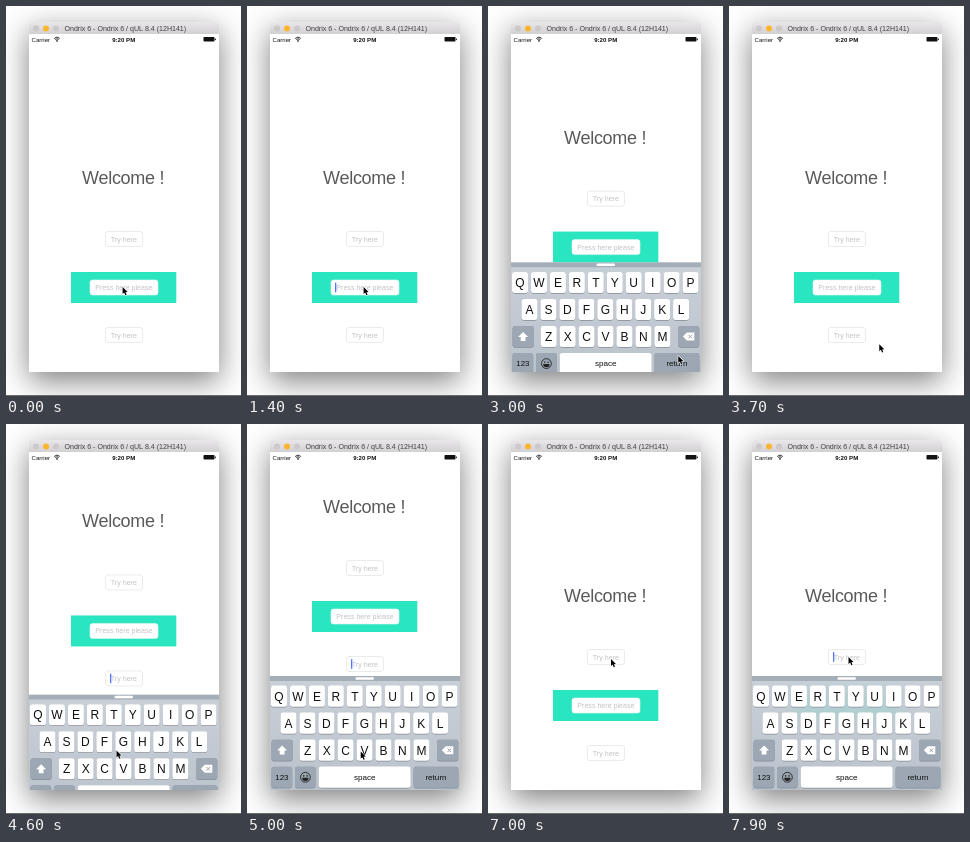
Recreate the animation shown at these times as an HTML page with a canvas. Size 235 by 390 pixels, loop 8000 ms.

```html
<!DOCTYPE html>
<html lang="en">
<head>
<meta charset="utf-8">
<title>Keyboard avoidance</title>
<style>
html, body { margin: 0; width: 100%; height: 100%; overflow: hidden; background: #fff; }
canvas { display: block; width: 235px; height: 390px; }
</style>
</head>
<body>
<canvas id="stage"></canvas>
<script>
const W = 235, H = 390, LOOP = 8000;
const SANS = '"Liberation Sans", Arial, sans-serif';
const TEAL = '#29e6c1';
const WIN = { x: 23, y: 16, w: 190, bottom: 366 };
const KEYS_H = 114, SLIDE = 500;

const canvas = document.getElementById('stage');
const ctx = canvas.getContext('2d');
const dpr = Math.max(1, window.devicePixelRatio || 1);
canvas.width = W * dpr;
canvas.height = H * dpr;

// Each keyboard session: show time, hide time, content lift, caret place
const sessions = [
  { show: 1450, hide: 2991, lift: 42, x: 88, y: 281.5 },
  { show: 4417, hide: 6150, lift: 89, x: 104, y: 329 },
  { show: 7350, hide: 9000, lift: 0, x: 104, y: 233 }
];

// Pointer stops: time, x, y
const pointer = [
  [0, 116.6, 281], [1450, 116.6, 281], [1800, 102.6, 279], [2150, 102.6, 279],
  [2800, 190.3, 350], [3250, 190.3, 350], [4150, 110.5, 326.5], [4900, 110.5, 326.5],
  [5700, 184, 351], [6250, 184, 351], [6950, 123, 235], [7100, 123, 235],
  [7320, 119.5, 233], [8000, 119.5, 233]
];

const clamp = v => Math.min(1, Math.max(0, v));
const smooth = v => v * v * (3 - 2 * v);
const cubic = (a, b, u) => 3 * a * u * (1 - u) ** 2 + 3 * b * u * u * (1 - u) + u ** 3;

function ease(x) {
  if (x <= 0 || x >= 1) return clamp(x);
  let lo = 0, hi = 1;
  for (let i = 0; i < 24; i++) {
    const mid = (lo + hi) / 2;
    if (cubic(0.38, 0.125, mid) < x) lo = mid; else hi = mid;
  }
  return cubic(0.7, 1, lo);
}

function state(t) {
  const s = sessions.findLast(k => t >= k.show - 50);
  if (!s) return { up: 0, lift: 0, caret: null };
  const up = ease((t - s.show) / SLIDE) - ease((t - s.hide) / SLIDE);
  const age = t - s.show + 50;
  const lit = t < s.hide && (age < 700 || age % 1000 < 680);
  return { up, lift: s.lift * up, caret: lit ? s : null };
}

function pointerAt(t) {
  const i = pointer.findIndex(p => p[0] > t);
  const a = pointer[i - 1], b = pointer[i];
  const k = smooth((t - a[0]) / (b[0] - a[0]));
  return [a[1] + (b[1] - a[1]) * k, a[2] + (b[2] - a[2]) * k];
}

function box(x, y, w, h, r, fill, line) {
  ctx.beginPath();
  ctx.roundRect(x, y, w, h, r);
  ctx.fillStyle = fill;
  ctx.fill();
  if (line) {
    ctx.strokeStyle = line;
    ctx.lineWidth = 0.6;
    ctx.stroke();
  }
}

function text(str, x, y, size, color, align = 'center', weight = '') {
  ctx.font = `${weight} ${size}px ${SANS}`;
  ctx.textAlign = align;
  ctx.textBaseline = 'alphabetic';
  ctx.fillStyle = color;
  ctx.fillText(str, x, y);
}

function dot(x, y, r, color) {
  ctx.beginPath();
  ctx.arc(x, y, r, 0, Math.PI * 2);
  ctx.fillStyle = color;
  ctx.fill();
}

function poly(points, fill) {
  ctx.beginPath();
  points.forEach(p => ctx.lineTo(...p));
  ctx.closePath();
  ctx.fillStyle = fill;
  ctx.fill();
}

function fade(y0, y1, a, b) {
  const g = ctx.createLinearGradient(0, y0, 0, y1);
  g.addColorStop(0, a);
  g.addColorStop(1, b);
  return g;
}

function drawWindow() {
  ctx.fillStyle = '#fff';
  ctx.fillRect(0, 0, W, H);
  ctx.save();
  ctx.shadowColor = 'rgba(0,0,0,.5)';
  ctx.shadowBlur = 30 * dpr;
  ctx.shadowOffsetY = 9 * dpr;
  box(WIN.x, WIN.y, WIN.w, WIN.bottom - WIN.y, [3, 3, 0, 0], '#fff');
  ctx.restore();
  box(WIN.x, WIN.y, WIN.w, 12, [3, 3, 0, 0], fade(16, 28, '#e9e7e9', '#d2d0d2'));
  ['#cdc8ca', '#fdb52d', '#cdc8ca'].forEach((c, i) => dot(30 + i * 10, 22.5, 3, c));
  text('Ondrix 6 - Ondrix 6 / qUL 8.4 (12H141)', 119.3, 25, 7.07, '#424142');
  ctx.fillStyle = '#6b6b6b';
  ctx.fillRect(0, 389, W, 1);
}

function drawStatus() {
  text('Carrier', 25.5, 35.5, 6.1, '#111', 'left');
  text('9:20 PM', 117.7, 35.5, 6.1, '#111', 'center', 'bold');
  ctx.strokeStyle = '#111';
  ctx.lineWidth = 0.9;
  for (const r of [2.3, 3.9]) {
    ctx.beginPath();
    ctx.arc(51, 35.2, r, -Math.PI * 0.76, -Math.PI * 0.24);
    ctx.stroke();
  }
  dot(51, 34.9, 0.8, '#111');
  box(197.5, 31, 11, 4.6, 0.8, '#111');
  box(209, 32.4, 0.9, 1.8, 0.4, '#111');
}

function field(label, x, y, w, line) {
  box(x, y - 7.5, w, 15, 2.5, '#fff', line);
  text(label, x + 5.3, y + 2.5, 7.1, '#c3c3c8', 'left');
}

function drawContent(s) {
  ctx.save();
  ctx.translate(0, -s.lift);
  ctx.letterSpacing = '-0.3px';
  text('Welcome !', 117.1, 178, 18, '#5a5a5a');
  ctx.letterSpacing = '0px';
  ctx.fillStyle = TEAL;
  ctx.fillRect(65, 266, 105.3, 31);
  field('Try here', 99.5, 233, 37, '#dedede');
  field('Press here please', 84, 281.5, 68, '#e2f3ef');
  field('Try here', 99.5, 329, 37, '#dedede');
  if (s.caret) {
    ctx.fillStyle = '#5574f6';
    ctx.fillRect(s.caret.x, s.caret.y - 4.8, 1.3, 9.6);
  }
  ctx.restore();
}

function key(x, y, w, label, size = 12, dark = false) {
  box(x, y - 10.3, w, 21.4, 2.4, '#858b92');
  box(x, y - 10.7, w, 21.2, 2.4, dark ? '#9ca7b3' : '#fff');
  if (label) text(label, x + w / 2, y + size * 0.355, size, '#111');
}

function drawShift(x, y) {
  poly([[x, y - 5], [x + 5, y], [x + 2.4, y], [x + 2.4, y + 4], [x - 2.4, y + 4], [x - 2.4, y], [x - 5, y]], '#fff');
}

function drawDelete(x, y) {
  poly([[x - 6, y], [x - 2, y - 4], [x + 5.5, y - 4], [x + 5.5, y + 4], [x - 2, y + 4]], '#fff');
  ctx.strokeStyle = '#8f9aa6';
  ctx.lineWidth = 0.9;
  ctx.beginPath();
  for (const d of [-1.8, 1.8]) {
    ctx.moveTo(x - 0.3, y + d);
    ctx.lineTo(x + 3.3, y - d);
  }
  ctx.stroke();
}

function drawSmile(x, y) {
  ctx.strokeStyle = '#222';
  ctx.lineWidth = 0.9;
  ctx.beginPath();
  ctx.arc(x, y, 4.9, 0, Math.PI * 2);
  ctx.stroke();
  dot(x - 1.7, y - 1.4, 0.8, '#222');
  dot(x + 1.7, y - 1.4, 0.8, '#222');
  ctx.beginPath();
  ctx.arc(x, y + 0.5, 3.2, 0, Math.PI);
  ctx.closePath();
  ctx.fillStyle = '#222';
  ctx.fill();
}

function drawKeyboard(s) {
  if (s.up <= 0.001) return;
  const top = WIN.bottom - KEYS_H * s.up;
  ctx.save();
  ctx.beginPath();
  ctx.rect(WIN.x, top, WIN.w, WIN.bottom - top);
  ctx.clip();
  ctx.fillStyle = fade(top, top + KEYS_H, '#c9d0d8', '#bac2cc');
  ctx.fillRect(WIN.x, top, WIN.w, KEYS_H);

  // Teal panel glowing through the translucent keyboard
  ctx.save();
  ctx.globalAlpha = 0.13;
  ctx.filter = `blur(${7 * dpr}px)`;
  ctx.fillStyle = TEAL;
  ctx.fillRect(65, 266 - s.lift, 105.3, 31);
  ctx.restore();

  ctx.fillStyle = '#a4aeb9';
  ctx.fillRect(WIN.x, top, WIN.w, 5);
  box(108.5, top + 1.2, 18.5, 2.6, 1.3, '#fff');

  const row = i => top + 20.3 + i * 27;
  const letters = (str, x, y) => [...str].forEach((c, i) => key(x + i * 18.95 - 8, y, 16, c));
  letters('QWERTYUIOP', 32, row(0));
  letters('ASDFGHJKL', 41.5, row(1));
  letters('ZXCVBNM', 60.7, row(2));
  key(24.5, row(2), 21.3, '', 0, true);
  drawShift(35.1, row(2) + 0.3);
  key(190, row(2), 21.3, '', 0, true);
  drawDelete(200.8, row(2));
  key(24.5, row(3), 20.7, '123', 8, true);
  key(48, row(3), 20.7, '', 0, true);
  drawSmile(58.4, row(3));
  key(71.7, row(3), 92, 'space', 8.1);
  key(166.6, row(3), 44.8, 'return', 8.1, true);
  ctx.restore();
}

function drawPointer([x, y]) {
  ctx.save();
  ctx.translate(x, y);
  ctx.lineJoin = 'round';
  ctx.beginPath();
  [[0, 0], [0, 7], [1.6, 5.6], [2.8, 8.2], [4, 7.7], [2.9, 5.2], [5, 5]].forEach(p => ctx.lineTo(...p));
  ctx.closePath();
  ctx.strokeStyle = '#fff';
  ctx.lineWidth = 1.1;
  ctx.stroke();
  ctx.fillStyle = '#000';
  ctx.fill();
  ctx.restore();
}

function draw(t) {
  const s = state(t);
  ctx.setTransform(dpr, 0, 0, dpr, 0, 0);
  drawWindow();
  drawStatus();
  drawContent(s);
  drawKeyboard(s);
  drawPointer(pointerAt(t));
}

const start = performance.now();
function tick() {
  draw((performance.now() - start) % LOOP);
  requestAnimationFrame(tick);
}
tick();
</script>
</body>
</html>
```
